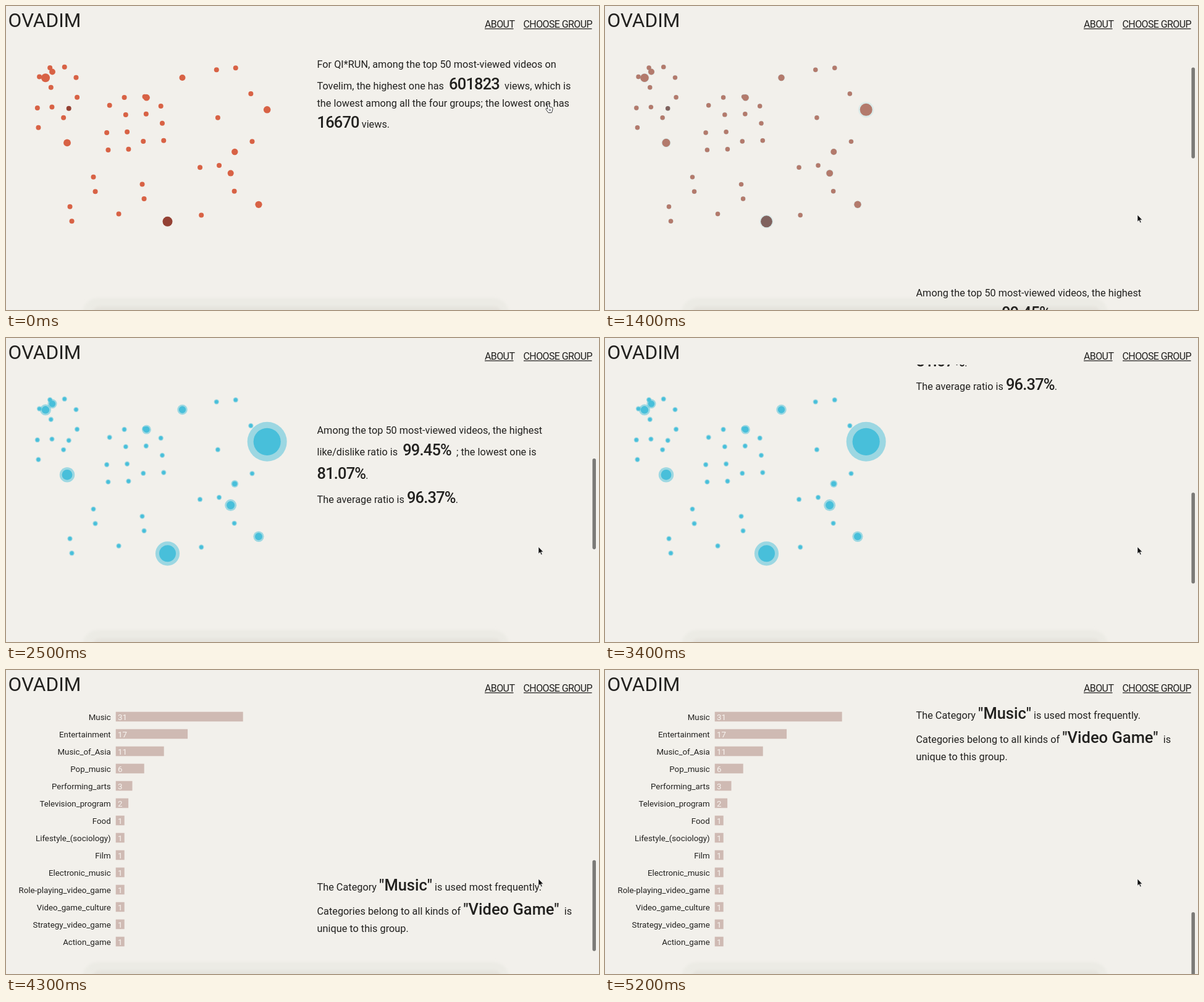
Write an HTML page that moves like this. It is 960 px wide and 492 px high and loops after 5700 ms.

```html
<!DOCTYPE html>
<html lang="en">
<head>
<meta charset="utf-8">
<title>Group statistics</title>
<style>
  html, body { margin: 0; width: 100%; height: 100%; overflow: hidden; background: #f2f0eb; }
  svg { display: block; width: 960px; height: 492px; font: 16.3px Roboto, "Open Sans", sans-serif; fill: #22211f; }
  text { white-space: pre; }
  .bg { fill: #f2f0eb; }
  .title { font-size: 31.6px; }
  .link { font-size: 16px; letter-spacing: -.6px; }
  .big { font-size: 25.5px; font-weight: 500; }
  .num { letter-spacing: -.85px; }
  .label { font-size: 13.3px; text-anchor: end; }
  .value { font-size: 13.3px; fill: #f8f5f1; }
  .bar { fill: #cfbab3; }
</style>
</head>
<body>
<svg viewBox="0 0 960 492">
  <defs>
    <filter id="soft" x="-10%" y="-100%" width="120%" height="300%"><feGaussianBlur stdDeviation="2"/></filter>
  </defs>
  <rect class="bg" width="960" height="492"/>
  <rect x="124" y="472.5" width="690" height="60" rx="25" fill="#ecebe5" filter="url(#soft)"/>
  <rect x="141" y="486.5" width="660" height="40" rx="9" fill="#e5e3dd" filter="url(#soft)"/>
  <g id="dots"></g>
  <g id="chart"></g>
  <g id="story"></g>
  <rect class="bg" width="960" height="43"/>
  <text class="title" x="3.5" y="34">OVADIM</text>
  <text class="link" x="775" y="35">ABOUT</text>
  <text class="link" x="837.5" y="35">CHOOSE GROUP</text>
  <path d="M775 36.8H821.5M838 36.8H948.5" stroke="#22211f" stroke-width="1.2"/>
  <rect id="thumb" x="949.4" width="5.6" height="147" rx="2.8" fill="#7b7a77"/>
  <g id="hand" transform="translate(873 156.5)">
    <path d="M4 1.5q1.5-1 2 .8l.6 4.2 4 1q1.7.5 1.5 2.2l-.8 4-1 2.5H5L1.3 11q-.8-1.6.6-2l2 1.2-.9-7.5Z"
      fill="#fff" stroke="#333"/>
    <path d="M6.5 10v3.5M8.4 10v3.5" stroke="#333" stroke-width=".8"/>
  </g>
  <path id="arrow" d="M0 0V11.2L2.6 8.8 4.4 13 6.2 12.2 4.4 8.2H7.8Z" fill="#111" stroke="#fff" stroke-width=".6"/>
</svg>
<script>
const LOOP = 5700, STEP = 100;
const $ = id => document.getElementById(id);
const clamp = v => Math.max(0, Math.min(1, v));
const progress = (t, start, end) => clamp((t - start) / (end - start));
const mix = (a, b, k) => a + (b - a) * k;
const smooth = k => k * k * (3 - 2 * k);

function set(el, attrs) {
  for (const name in attrs) el.setAttribute(name, attrs[name]);
}

function add(parent, tag, attrs, content) {
  const el = document.createElementNS('http://www.w3.org/2000/svg', tag);
  set(el, attrs);
  if (content !== undefined) el.textContent = content;
  return parent.appendChild(el);
}

const RED = [216, 98, 69], DARK = [148, 65, 51], BLUE = [72, 191, 218];
const dots = [];

function addDot(cx, cy, views = 4, votes = 4.2, color = RED) {
  const halo = add($('dots'), 'circle', { cx, cy, fill: `rgb(${BLUE})` });
  const core = add($('dots'), 'circle', { cx, cy });
  dots.push({ halo, core, views, votes, color });
}

// Ordinary videos spread evenly over an area by an additive recurrence.
function scatter(count, left, top, right, bottom) {
  for (let n = 1; n <= count; n++) {
    addDot(mix(left, right, (.5 + .7549 * n) % 1), mix(top, bottom, (.5 + .5698 * n) % 1));
  }
}
scatter(10, 50, 92, 133, 206);
scatter(13, 162, 141, 278, 241);
scatter(7, 102, 271, 257, 355);
scatter(9, 313, 84, 422, 361);

// Standout videos: position, radius by views, radius by votes.
addDot(64, 116.3, 7, 9);
addDot(75, 106.5, 4.9, 7.5);
addDot(285.5, 116, 5, 8.2);
addDot(227.5, 148.2, 5.4, 7.4);
addDot(422.7, 167.8, 5.8, 32);
addDot(99, 221.4, 5.9, 12.2);
addDot(370.3, 236, 5.2, 5.9);
addDot(363.7, 270.6, 5, 9.5);
addDot(409, 321.3, 5.6, 8.6);
addDot(261.5, 348.8, 8, 19.6, DARK);
addDot(101.7, 165.8, 4, 4.2, DARK);

const categories = {
  Music: 31, Entertainment: 17, Music_of_Asia: 11, Pop_music: 6, Performing_arts: 3,
  Television_program: 2, Food: 1, 'Lifestyle_(sociology)': 1, Film: 1, Electronic_music: 1,
  'Role-playing_video_game': 1, Video_game_culture: 1, Strategy_video_game: 1, Action_game: 1
};
Object.entries(categories).forEach(([name, count], i) => {
  const y = 67.7 + 28 * i;
  add($('chart'), 'text', { class: 'label', x: 169.7, y: y + 13.2 }, name);
  add($('chart'), 'rect', { class: 'bar', x: 177.7, y, width: 7.6 + 6.4 * count, height: 15.6 });
  add($('chart'), 'text', { class: 'value', x: 181, y: y + 13.2 }, count);
});

// Asterisk pairs around a run ask for emphasis; emphasised lines stand taller.
function addParagraph(y, lines) {
  let wasBig = false;
  lines.forEach((line, i) => {
    const runs = line.split('|');
    const isBig = runs.length > 1;
    if (i) y += !isBig ? 28 : wasBig ? 38.5 : 34.5;
    wasBig = isBig;
    const text = add($('story'), 'text', { x: 503.5, y });
    runs.forEach((run, j) => {
      const look = j % 2 ? (/\d/.test(run) ? 'big num' : 'big') : 'body';
      add(text, 'tspan', { class: look }, run);
    });
  });
}
addParagraph(248, [
  'For QI*RUN, among the top 50 most-viewed videos on',
  'Tovelim, the highest one has  |601823|  views, which is',
  'the lowest among all the four groups; the lowest one has',
  '|16670| views.'
]);
addParagraph(798.5, [
  'Among the top 50 most-viewed videos, the highest',
  'like/dislike ratio is  |99.45%|  ; the lowest one is',
  '|81.07%|.',
  'The average ratio is |96.37%|.'
]);
addParagraph(1373, [
  'The Category |"Music"| is used most frequently.',
  'Categories belong to all kinds of |"Video Game"|  is',
  'unique to this group.'
]);

// Wheel gestures: start, end, offset reached, and how sharply they slow down.
const gestures = [
  [700, 1300, 314, 3],
  [1300, 1600, 357, 1],
  [1800, 2200, 545, 1],
  [2300, 2900, 742, 1.7],
  [3100, 3900, 956, 1.06],
  [4000, 4600, 1073, 1.03],
  [4600, 5200, 1294, 2]
];
const scrollAt = t => gestures.reduce(
  (from, [start, end, to, power]) => mix(from, to, 1 - (1 - progress(t, start, end)) ** power), 148);

function render(t) {
  const scroll = scrollAt(t);
  set($('story'), { transform: `translate(0 ${-scroll})` });
  set($('thumb'), { y: scroll / 3.3, opacity: t < 800 ? 0 : 1 });

  const blue = smooth(progress(t, 1300, 1600));
  for (const { halo, core, views, votes, color } of dots) {
    set(core, {
      r: mix(views, votes * .69, blue),
      fill: `rgb(${color.map((c, i) => Math.round(mix(c, BLUE[i], blue)))})`
    });
    set(halo, { r: mix(views, votes, blue), opacity: .5 * blue });
  }

  const chart = progress(t, 3600, 3900);
  set($('chart'), { opacity: chart });
  set($('dots'), { opacity: 1 - chart });

  const move = smooth(progress(t, 200, 600));
  set($('hand'), { opacity: t < 300 ? 1 : 0 });
  set($('arrow'), {
    opacity: t < 300 ? 0 : 1,
    transform: `translate(${mix(878, 862, move)} ${mix(158, 338, move)})`
  });
}

const start = performance.now();
function tick() {
  const t = (performance.now() - start) % LOOP;
  render(Math.floor(t / STEP) * STEP);
  requestAnimationFrame(tick);
}
tick();
</script>
</body>
</html>
```
